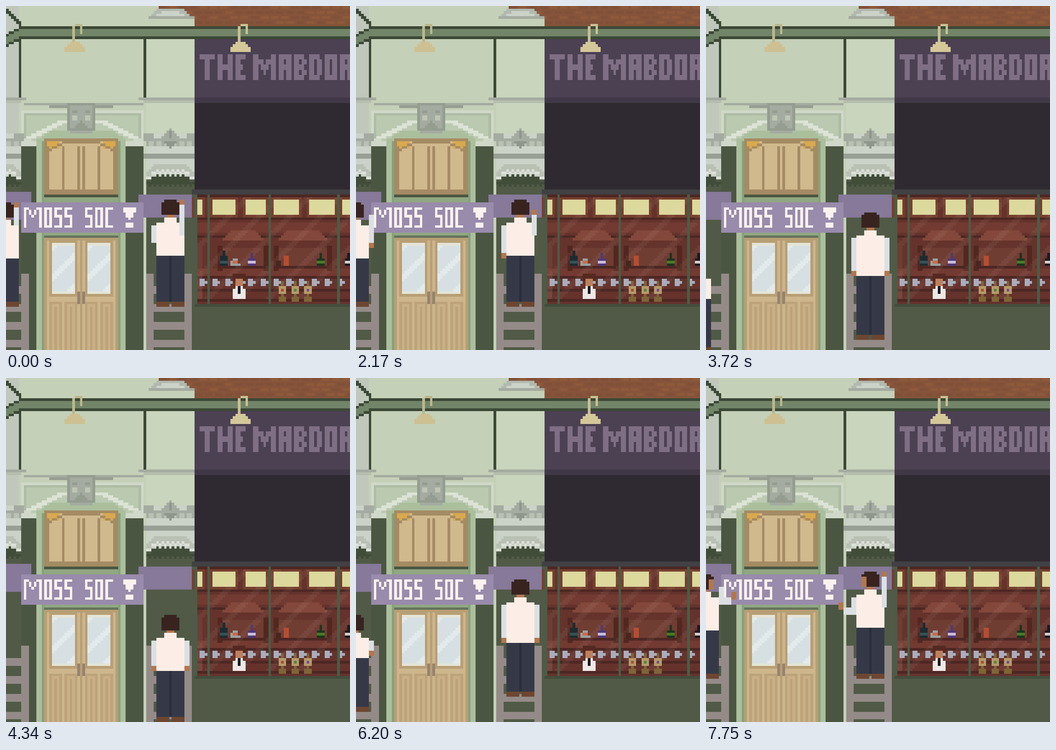
An HTML page with a canvas for the animation above (8000 ms loop, 748 px wide and 748 px high).

```html
<!DOCTYPE html>
<html lang="en">
<head>
<meta charset="utf-8">
<title>Hanging the banner</title>
<style>
  html, body { margin: 0; width: 100%; height: 100%; overflow: hidden; }
  canvas { display: block; width: 100vw; height: 100vh; image-rendering: pixelated; }
</style>
</head>
<body>
<canvas id="stage" width="135" height="135" role="img" aria-label="THE MABDOR, MOSS SOC"></canvas>
<script>
const SIZE = 135;
const stage = document.getElementById('stage');
const backdrop = document.createElement('canvas');
backdrop.width = backdrop.height = SIZE;
let ctx = backdrop.getContext('2d');

function box(color, x, y, w, h) {
  ctx.fillStyle = color;
  ctx.fillRect(x, y, w, h);
}

// A box and its mirror image; axis is twice the mirror line's x
function pair(color, axis, x, y, w, h) {
  box(color, x, y, w, h);
  box(color, axis - x - w, y, w, h);
}

// Centred rows that widen by a fixed amount
function taper(color, axis, y, rows, width, grow) {
  for (let i = 0; i < rows; i++) {
    const w = width + grow * i;
    box(color, Math.floor((axis - w) / 2), y + i, w, 1);
  }
}

function framed(edge, fill, x, y, w, h) {
  box(edge, x, y, w, h);
  box(fill, x + 1, y + 1, w - 2, h - 2);
}

function bitmap(color, x, y, rows, heights) {
  rows.split('/').forEach((row, j) => {
    [...row].forEach((c, i) => c === '#' && box(color, x + i, y, 1, heights[j]));
    y += heights[j];
  });
}

function shifted(dx, draw) {
  ctx.save();
  ctx.translate(dx, 0);
  draw();
  ctx.restore();
}

const noise = (x, y) => Math.abs(Math.sin(x * 12.9 + y * 78.2) * 43758) % 1;

const THIN = {
  M: '##...##/#.#.#.#/#..#..#/#.....#/#.....#',
  O: '###/#.#/#.#/#.#/###',
  S: '###/#../###/..#/###',
  C: '###/#../#../#../###',
  '!': '#####/.###./..#../...../.###.'
};
const BOLD = {
  T: '######/..##../..##../..##../..##..',
  H: '##..##/##..##/######/##..##/##..##',
  E: '####/##../###./##../####',
  M: '##.....##/####.####/##.###.##/##..#..##/##.....##',
  A: '#####/##.##/#####/##.##/##.##',
  B: '####./##.##/####./##.##/####.',
  D: '####./##.##/##.##/##.##/####.',
  O: '#####/##.##/##.##/##.##/#####',
  R: '#####/##.##/####./##.##/##.##'
};
function lettering(text, font, x, y, color, heights, space) {
  for (const ch of text) {
    if (ch === ' ') { x += space; continue; }
    bitmap(color, x, y, font[ch], heights);
    x += font[ch].indexOf('/') + 1;
  }
}

const WALL = '#c5d0b8', LINE = '#3c4836', CORNICE = '#728568';
const PALE = '#cbd2c7', STONE = '#a4aba0', MOSS = '#505a46', SHADOW = '#4b5642';

function facade() {
  box(WALL, 0, 0, 74, SIZE);
  box('#c9d5bc', 55, 13, 19, 37);
  box('#bfc8bb', 0, 0, 5, 50);
  pair(LINE, 60, 5, 12, 1, 24);
  // cornice, bending down at the left edge
  for (let x = 0; x < SIZE; x++) {
    const y = 8 + Math.max(0, Math.ceil((5 - x) / 2));
    box(LINE, x, y, 1, 5);
    box(CORNICE, x, y + 1, 1, 3);
    if (x < 6) box(LINE, x, x + 1, 1, 2);
  }
  // ledges
  pair(STONE, 60, -8, 36, 16, 1);
  pair('#b5beae', 60, -10, 37, 16, 1);
  box(STONE, 74, 36, 0, 1);
  box(STONE, 52, 36, 22, 1);
  box('#b5beae', 54, 37, 20, 1);
  box(STONE, 7, 38, 47, 1);
  box('#969f91', 17, 39, 25, 1);
  // arch moulding
  box('#d0d9c9', 6, 41, 48, 14);
  pair('#aebca5', 60, 7, 42, 18, 10);
  pair('#bac9af', 60, 8, 43, 17, 8);
  taper('#dce3d5', 60, 45, 7, 20, 4);
  taper('#bccab1', 60, 46, 7, 16, 4);
  taper('#abbf9d', 60, 49, 4, 26, 3);
  // keystone face
  framed('#949d90', STONE, 24, 38, 11, 11);
  box(STONE, 25, 49, 9, 1);
  pair('#bdc5b4', 59, 26, 43, 2, 2);
  pair('#949d90', 59, 26, 41, 2, 1);
  taper('#949d90', 59, 45, 3, 1, 2);
  // door surround
  pair(SHADOW, 60, 6, 55, 7, 80);
  pair('#abbf9d', 59, 12, 53, 3, 82);
  pair('#87a07c', 59, 14, 53, 1, 82);
}

function column() {
  const left = 55, width = 19, axis = 2 * left + width;
  box(MOSS, left, 67, width, 68);
  box(PALE, left, 50, width, 18);
  // carved capital
  for (let x = 0; x < width; x++) box(x % 3 ? '#b9c0b4' : STONE, left + x, 52, 1, 3);
  pair(STONE, axis, left - 1, 50, 4, 2);
  taper(STONE, axis, 48, 5, 1, 2);
  box('#8f978d', 64, 49, 1, 7);
  taper('#8f978d', axis, 53, 2, 5, -2);
  box(STONE, left - 1, 52, width + 2, 1);
  box('#989f95', left - 1, 58, width + 1, 2);
  // scalloped fringe over leaves
  for (let x = 0; x < width; x++) {
    const droop = Math.max(0, Math.abs(x - 9) - 6);
    box('#b9c0b4', left + x, 62 + droop, 1, 3);
    box('#dce1d9', left + x, 64 + droop + x % 2, 1, 1);
    box('#414c39', left + x, 66 + droop + x % 2, 1, 4 - droop);
  }
}

function entrance() {
  const axis = 59, bar = '#a48b63';
  // fanlight
  box(bar, 15, 52, 29, 22);
  box('#d1b98e', 16, 53, 27, 20);
  pair('#d9a94f', axis, 16, 53, 5, 3);
  for (const x of [16, 22, 28]) pair(bar, axis, x, 55, 1, 18);
  for (let x = 0; x < 14; x++) pair(bar, axis, 16 + x, 56 - Math.min(3, x >> 1), 1, 1);
  box(bar, 16, 72, 27, 1);
  box(SHADOW, 15, 74, 29, 1);
  box('#91a782', 15, 75, 29, 15);
  // double doors
  box('#65735a', 15, 90, 29, 1);
  framed('#b89f75', '#cdb58c', 15, 91, 29, 45);
  box('#b89f75', 29, 91, 1, 44);
  for (const x of [17, 31]) {
    framed('#b89f75', '#e5e5d6', x, 92, 11, 22);
    for (let y = 0; y < 18; y++)
      for (let i = 0; i < 9; i++)
        box((i + y + 1) % 12 < 3 ? '#e2eaeb' : '#d6e0e2', x + 1 + i, 94 + y, 1, 1);
    for (const panel of [x, x + 6]) {
      framed('#bca379', '#c9b086', panel, 116, 5, 20);
      box('#bca379', panel + 2, 118, 1, 17);
    }
  }
  pair('#95836f', axis, 28, 112, 1, 5);
}

function bricks() {
  box('#85543a', 60, 0, 75, 8);
  for (let y = 0; y < 8; y += 2)
    for (let x = 60 + y % 4; x < SIZE; x += 4)
      box(noise(x, y) < .4 ? '#8e5a3a' : '#815038', x, y, 3, 1);
  box(WALL, 55, 0, 3, 8);
  box(WALL, 55, 5, 19, 3);
  taper('#b2b9af', 129, 1, 4, 11, 2);
  taper(PALE, 129, 2, 2, 7, 4);
  box(STONE, 56, 4, 18, 1);
}

function bottle(x, height, color, label) {
  const y = 102 - height;
  box(color, x + 1, y, 1, height);
  box(color, x, y + 2, 3, height - 2);
  box(label, x, 100, 3, 1);
}

function sign() {
  box('#4c4053', 74, 13, 61, 23);
  box('#403846', 74, 36, 61, 2);
  box('#2f2a31', 74, 38, 61, 34);
  box('#414044', 73, 72, 62, 2);
  lettering('THE MABDOR', BOLD, 76, 19, '#7f6f84', Array(5).fill(2), 2);
}

function pub() {
  const dark = '#4d2723', lit = '#723a31';
  box('#65332c', 74, 74, 61, 43);
  for (const y of [74, 83, 90, 106, 111, 115]) box(dark, 74, y, 61, 1);
  box(lit, 74, 85, 61, 4);
  box(lit, 74, 103, 61, 3);
  for (const [x, w] of [[74, 3], [81, 9], [94, 8], [105, 10], [119, 10], [132, 9]])
    framed('#75402f', '#dcd99d', x - 1, 75, w + 2, 8);
  for (const [axis, w] of [[186, 18], [233, 21]]) {
    const x = (axis - w) / 2;
    pair('#52271f', axis, x - 1, 94, 2, 10);
    taper('#83483b', axis, 88, 4, w - 8, 2);
    box('#703d33', x + 1, 95, w - 2, 7);
    box(dark, x, 102, w, 1);
  }
  // window glare
  for (let y = 75; y < 115; y++)
    for (let start = 168; start < 230; start += 12)
      box('rgba(255,210,200,.06)', Math.max(74, start - y), y, 3, 1);
  // taps
  for (let x = 76; x < SIZE; x += x === 91 ? 4 : 5) {
    box('#a9adbc', x, 107, 2, 3);
    box('#a9adbc', x + 2, 108, 1, 1);
  }
  bottle(84, 6, '#1d2c31', '#32535a');
  bottle(95, 5, '#4e3879', '#c9bddd');
  bottle(122, 5, '#1c351d', '#497b29');
  bottle(133, 5, '#1d191f', '#d3cdcb');
  taper('#9ca09f', 180, 99, 3, 2, 1);
  box('#cc694a', 89, 100, 2, 1);
  box('#46271e', 106, 100, 2, 2);
  box('#b74d31', 109, 98, 2, 4);
  // beer pumps
  ['#a85030', '#55883c', '#734893'].forEach((color, i) => {
    const x = 107 + 5 * i;
    box('#806437', x + 1, 108, 1, 6);
    box('#b59b6b', x, 110, 3, 3);
    box('#806437', x, 114, 3, 2);
    box(color, x + 1, 111, 1, 1);
  });
  // bartender
  box('#552920', 89, 105, 5, 3);
  box('#bd805d', 90, 107, 3, 3);
  taper('#eee9e6', 183, 110, 2, 3, 2);
  box('#eee9e6', 89, 112, 5, 3);
  box('#171a21', 91, 110, 1, 3);
  // frames and lower wall
  for (const x of [74, 79, 103, 130]) box('#4b5c45', x, 74, 1, 43);
  box(MOSS, 74, 117, 61, 18);
  box('#434d3c', 74, 117, 61, 1);
}

function lamp(x, pole, shade) {
  box(pole, x + 3, 8, 1, 7);
  box(pole, x + 4, 7, 3, 1);
  box(pole, x + 6, 8, 1, 3);
  taper(shade, 2 * x + 8, 14, 3, 4, 2);
  box(shade, x, 17, 8, 1);
}

function ladder() {
  const color = '#948b88';
  pair(color, 128, 55, 105, 3, 30);
  for (let y = 110; y < SIZE; y += 7) box(color, 56, y, 16, 3);
}

function banner() {
  box('#867999', 0, 73, 10, 11);
  box('#867999', 52, 74, 21, 9);
  box('#998bab', 6, 77, 48, 12);
  lettering('MOSS SOC', THIN, 7, 79, '#fbf2ef', [1, 2, 1, 3, 1], 4);
  lettering('!', THIN, 46, 79, '#fbf2ef', [2, 2, 1, 1, 2]);
}

facade();
column();
shifted(-68, column);
entrance();
bricks();
sign();
pub();
lamp(23, '#bbb78c', '#cdc092');
lamp(88, '#c9c094', '#d4c899');
ladder();
shifted(-64, ladder);
banner();

const SKIN = '#b2774f', SLEEVE = '#dce0e3', SHIRT = '#fceee6', HAIR = '#38231f';

function leg(x, waist, shoe) {
  box('#353947', x, waist, 5, shoe - waist);
  box('#6d4630', x, shoe, 5, 2);
}

function man(head, waist, leftShoe, rightShoe = leftShoe) {
  leg(59, waist, leftShoe);
  leg(65, waist, rightShoe);
  box('#292e3b', 64, waist, 1, Math.min(leftShoe, rightShoe) - waist);
  box(SKIN, 63, head + 6, 3, 1);
  box(SHIRT, 62, head + 7, 5, 2);
  box(SHIRT, 59, head + 9, 11, waist - head - 9);
  box(HAIR, 62, head, 5, 1);
  box(HAIR, 61, head + 1, 7, 5);
}

function armsDown(head, waist) {
  pair(SLEEVE, 129, 57, head + 10, 2, waist - head - 12);
  pair(SKIN, 129, 57, waist - 2, 2, 2);
}

// The arm nearest the banner: bent, reaching out, then lowered
function innerArm(step) {
  const reach = step > 2 && step < 6 ? Math.min(3, 2 * step - 5) : 0;
  const length = step === 7 ? 11 : 7;
  box(SLEEVE, 57, 86, 2, length);
  if (reach) {
    box(SLEEVE, 57 - reach, 90, reach + 2, 3);
    box(SKIN, 55 - reach, 88, 2, 3);
  } else if (step > 5) box(SKIN, 57, 86 + length, 2, 2);
}

function pinning(step) {
  shifted(-65, () => man(77, 99, 116));
  man(76, 98, 116);
  const turn = step > 1 && step < 6 ? Math.min(2, step - 1) : 0;
  box(SKIN, 61, 78, turn, 4);
  box(SKIN, 3 - turn, 79, turn, 4);
  // outer arm holds the banner up, then comes down
  const x = step ? 69 : 68, y = 76 + 2 * Math.max(0, step - 5);
  box(SLEEVE, x, y + 2, 2, 88 - y);
  box(SKIN, x, y, 2, 2);
  innerArm(step);
  if (step) {
    ctx.save();
    ctx.transform(-1, 0, 0, 1, 64, -4);
    innerArm(step);
    ctx.restore();
  } else {
    box(SLEEVE, 3, 79, 2, 7);
    box(SKIN, 3, 77, 2, 2);
  }
}

const HEADS = [76, 76, 79, 81, 81, 87, 93];
const WAISTS = [98, 99, 104, 106, 106, 111, 115];

function climbing(step) {
  if (step < 5) {
    const head = Math.round(79 + 7 * Math.min(step, 2) + 2.5 * Math.max(0, step - 2));
    shifted(step < 3 ? -65 : -68, () => {
      man(head, head + 17, head + 36);
      if (step < 3) armsDown(head, head + 16);
    });
  }
  // feet move down one rung in turn, then both slide
  const foot = lead => step > 4 ? 121 + 2 * step : Math.round(116 + 6.5 * Math.floor((step + lead) / 3));
  man(HEADS[step], WAISTS[step], foot(2), foot(3));
  armsDown(HEADS[step], WAISTS[step]);
}

const STEP = 310, LOOP = 8000, LOWEST = 14;

// Up to the lowest pose, a rest of three steps, then back
function poseAt(t) {
  const n = Math.floor(t / STEP);
  return Math.min(n, LOWEST, 2 * LOWEST + 2 - n);
}

ctx = stage.getContext('2d');
let shown = -1;
function draw(now) {
  const pose = poseAt(now % LOOP);
  if (pose !== shown) {
    shown = pose;
    ctx.drawImage(backdrop, 0, 0);
    if (pose < 8) pinning(pose);
    else climbing(pose - 8);
  }
  requestAnimationFrame(draw);
}
draw(0);
</script>
</body>
</html>
```
